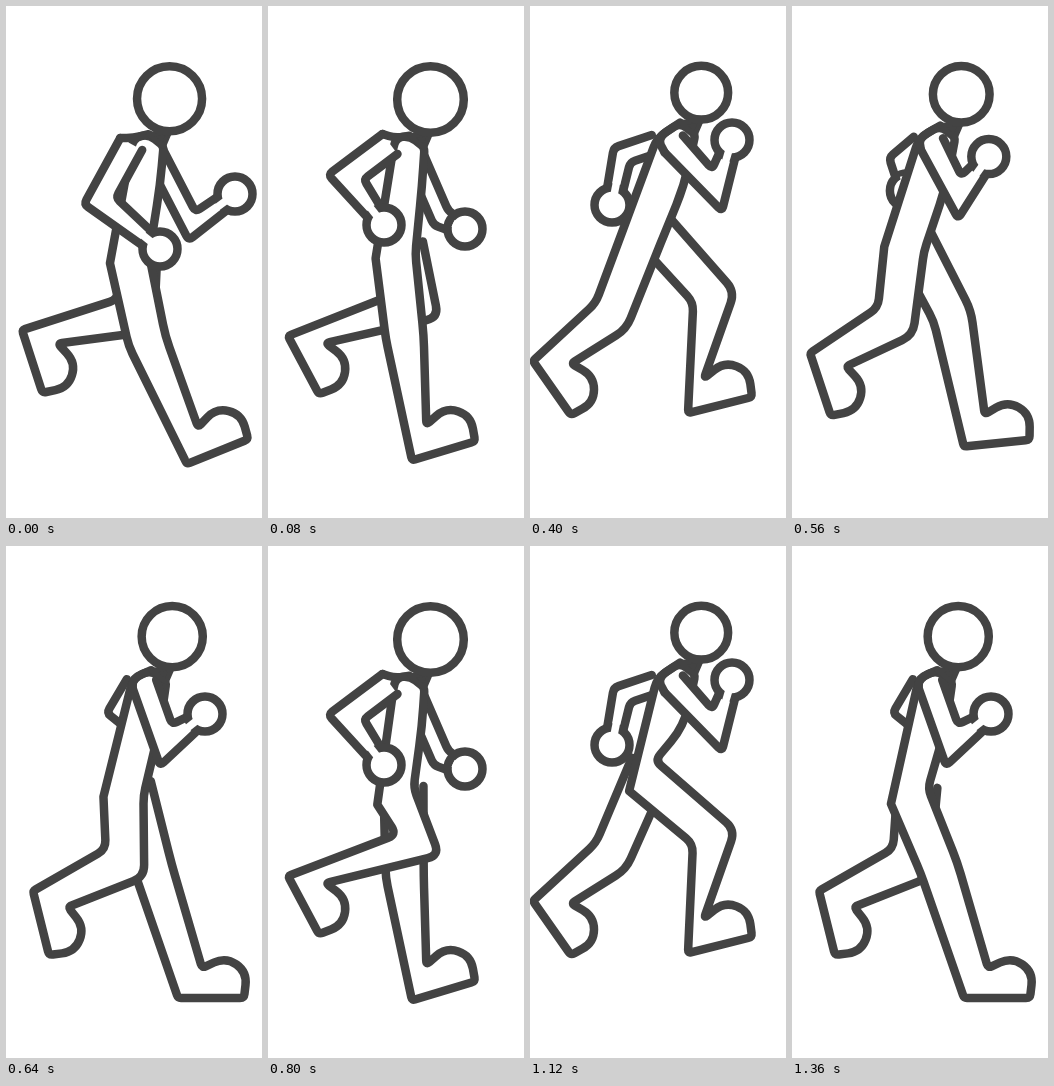
Recreate the animation shown at these times as an HTML page with a canvas. Size 256 px wide and 512 px high, loop 1440 ms.

```html
<!DOCTYPE html>
<html lang="en">
<head>
<meta charset="utf-8">
<title>Running figure</title>
<style>
  html, body { margin: 0; width: 100%; height: 100%; overflow: hidden; background: #fff; }
  canvas { display: block; width: 100vw; height: 100vh; }
</style>
</head>
<body>
<canvas id="stage" width="256" height="512"></canvas>
<script>
const STEPS = 18, STEP_MS = 80, HALF = STEPS / 2;
const INK = '#434343', PAPER = '#fff', LINE = 8.5;
const ctx = document.getElementById('stage').getContext('2d');

// One stride, shared by both legs half a cycle apart: step, knee, heel, sole angle
const stride = cycle([
  [0, 141, 335, 181, 458, -22],
  [3, 124, 317, 57, 434, 8],
  [5, 81, 310, 3, 355, 55],
  [8, 119, 317, 27, 345, 76],
  [9, 130, 309, 16, 324, 72],
  [10, 150, 299, 20, 330, 62],
  [12, 170, 300, 36, 318, 70],
  [14, 184, 291, 158, 407, -14],
  [17, 147, 322, 172, 452, 0]
]);

// One arm swing; the arms swap layers every half cycle: step, elbow, fist
const swing = cycle([
  [0, 94, 195, 154, 243],
  [1, 78, 171, 116, 219],
  [3, 147, 201, 198, 226],
  [5, 187, 184, 202, 134],
  [8, 160, 199, 199, 168],
  [9, 186, 220, 229, 188],
  [10, 173, 212, 197, 223],
  [12, 103, 177, 140, 200],
  [14, 92, 149, 82, 199],
  [17, 113, 165, 138, 187]
]);

const SHOULDER = [127, 132], CHEST = [154, 180];

// Smooth looping interpolation through the key poses
function cycle(keys) {
  const n = keys.length;
  const key = i => {
    const [t, ...v] = keys[(i + n) % n];
    return { t: t + STEPS * Math.floor(i / n), v };
  };
  return time => {
    const t = time % STEPS;
    let i = n - 1;
    while (keys[i][0] > t) i--;
    const [a, b, c, d] = [-1, 0, 1, 2].map(k => key(i + k));
    const span = c.t - b.t, u = (t - b.t) / span, q = 1 - u;
    return b.v.map((p, j) => {
      const m0 = (c.v[j] - a.v[j]) / (c.t - a.t) * span;
      const m1 = (d.v[j] - p) / (d.t - b.t) * span;
      return p * (1 + 2 * u) * q * q + m0 * u * q * q
        + c.v[j] * u * u * (3 - 2 * u) - m1 * u * u * q;
    });
  };
}

// The body bobs twice per cycle.
const bob = (t, lag) => Math.cos((t - lag) / HALF * 2 * Math.PI);

const add = (p, d, k = 1) => [p[0] + d[0] * k, p[1] + d[1] * k];
const sub = (p, q) => [p[0] - q[0], p[1] - q[1]];
const unit = d => {
  const len = Math.hypot(...d) || 1;
  return [d[0] / len, d[1] / len];
};
const normal = (a, b) => {
  const [x, y] = unit(sub(b, a));
  return [y, -x];
};

// Both edges of a two-bone limb; widths are half widths at its joints.
function limb(joints, widths, sharpest) {
  const [a, b, c] = joints;
  const n1 = normal(a, b), n2 = normal(b, c);
  const mid = unit(add(n1, n2));
  const miter = Math.max(sharpest, mid[0] * n1[0] + mid[1] * n1[1]);
  const edge = side => [
    add(a, n1, side * widths[0]),
    add(b, mid, side * widths[1] / miter),
    add(c, n2, side * widths[2])
  ];
  return [edge(1), edge(-1)];
}

const corner = (p, r = 0) => ({ p, r });

function toward(p, q, r) {
  const d = sub(q, p), len = Math.hypot(...d) || 1;
  return add(p, d, Math.min(r / len, 0.5));
}

// Open path with softened corners
function outline(corners) {
  const path = new Path2D(), last = corners.length - 1;
  corners.forEach(({ p, r }, i) => {
    if (i === 0 || i === last || !r) return path.lineTo(...p);
    path.lineTo(...toward(p, corners[i - 1].p, r));
    path.quadraticCurveTo(...p, ...toward(p, corners[i + 1].p, r));
  });
  return path;
}

function stroke(path, color = INK, width = LINE) {
  ctx.strokeStyle = color;
  ctx.lineWidth = width;
  ctx.stroke(path);
}

function fill(path, color = PAPER) {
  ctx.fillStyle = color;
  ctx.fill(path);
}

function shape(path) {
  fill(path);
  stroke(path);
}

function circle([x, y], r) {
  const path = new Path2D();
  path.arc(x, y, r, 0, Math.PI * 2);
  return path;
}

// Outline from front hip, around the foot, to back hip
function leg(t, hip) {
  const [kx, ky, hx, hy, degrees] = stride(t);
  const knee = [kx, ky], heel = [hx, hy], tilt = degrees * Math.PI / 180;
  const sole = [Math.cos(tilt), Math.sin(tilt)], up = [sole[1], -sole[0]];
  const foot = (s, h) => add(add(heel, sole, s), up, h);
  const [front, back] = limb([hip, knee, heel], [20, 19, 0], 0.8);
  return [
    corner(front[0], 8), corner(front[1], 12),
    corner(foot(24, 30), 4), corner(foot(48, 41), 30),
    corner(foot(69, 26), 30), corner(foot(66, 0), 4), corner(heel, 3),
    corner(back[1], 9), corner(back[0], 8)
  ];
}

// Returns where the limb's left edge meets the shoulder.
function drawArm(t, width) {
  const [ex, ey, fx, fy] = swing(t);
  const elbow = [ex, ey], fist = [fx, fy];
  const shoulder = [133 + (ex - 133) * 0.2, 138];
  const wrist = add(fist, unit(sub(fist, elbow)), -12);
  const [one, two] = limb([shoulder, elbow, wrist], [width, width, 8], 0.58);
  const edge = pts => outline(pts.map(p => corner(p, 5)));
  fill(outline([...one, ...two.reverse()].map(p => corner(p))));
  stroke(edge(one));
  stroke(edge(two));
  shape(circle(fist, 17.5));
  ctx.lineCap = 'butt';
  stroke(outline([corner(toward(fist, elbow, 24)), corner(fist)]), PAPER, 16 - LINE);
  ctx.lineCap = 'round';
  return one[0][0] < two[2][0] ? one[0] : two[2];
}

function draw(t) {
  const sway = bob(t, 1);
  const head = [167 - 4.5 * sway, 90 + 3.5 * sway], radius = 30 + 3.3 * sway;
  const chin = head[1] + radius;
  const nape = [head[0] - 21, chin + 3], throat = [head[0] - 6, chin + 15];
  const hip = [119 + 9 * bob(t, 1.5), 241 + 12 * bob(t, 0)];
  const beat = t % HALF;

  ctx.clearRect(0, 0, 256, 512);
  drawArm(beat + HALF, 9.5);
  shape(outline(leg(t + HALF, add(hip, [8, -10]))));

  const near = leg(t, hip);
  shape(outline([
    near[near.length - 1], corner(SHOULDER, 10), corner(nape, 8),
    corner(throat, 4), corner(CHEST, 20), ...near
  ]));
  const joint = drawArm(beat, 12.5);
  stroke(outline([corner(nape), corner(SHOULDER, 12), corner(joint)]));

  const neck = outline([nape, [head[0], chin + 1], throat, nape].map(p => corner(p)));
  fill(neck, INK);
  stroke(neck, INK, 5);
  shape(circle(head, radius));
}

ctx.lineCap = ctx.lineJoin = 'round';
let shown = -1;
function tick() {
  const step = Math.floor(performance.now() / STEP_MS) % STEPS;
  if (step !== shown) draw(shown = step);
  requestAnimationFrame(tick);
}
tick();
</script>
</body>
</html>
```
